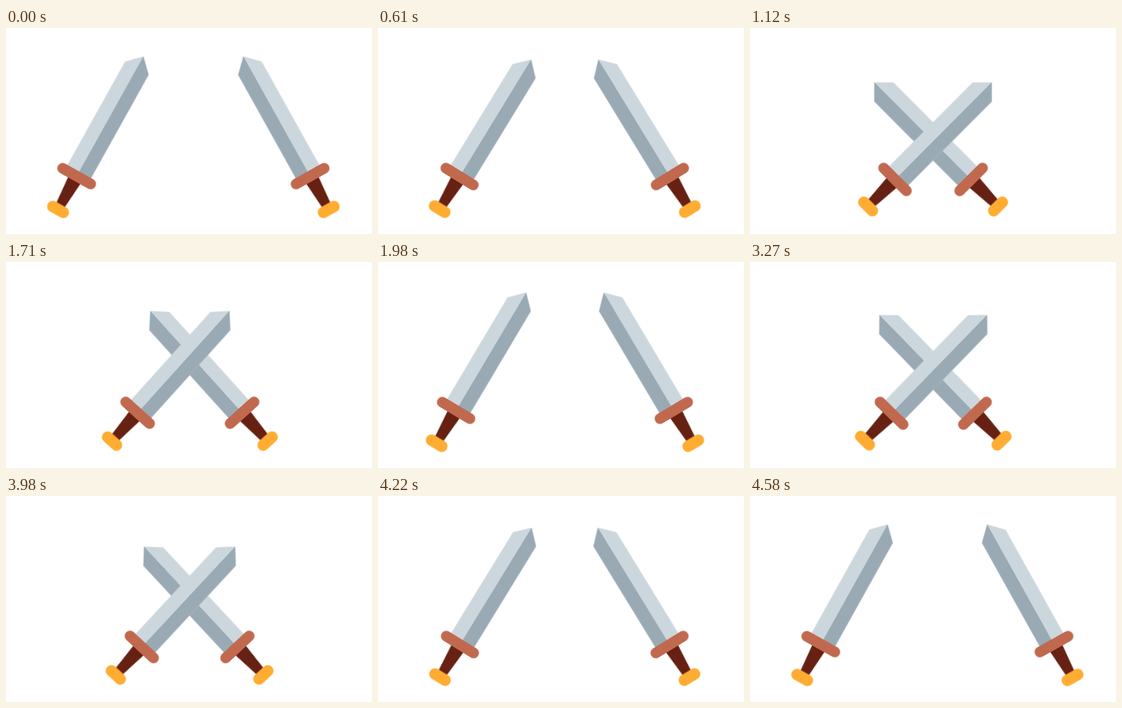
Recreate the animation shown at these times as an HTML page. Size 480 px wide and 270 px high, loop 4610 ms.

```html
<!DOCTYPE html>
<html lang="en">
<head>
<meta charset="utf-8">
<title>Crossing swords</title>
<style>
  html, body {
    margin: 0;
    width: 100%;
    height: 100%;
    overflow: hidden;
    background: #fff;
  }

  svg {
    display: block;
    width: 480px;
    height: 270px;
  }

  /* The origin of a sword is the middle of its grip. */
  .sword {
    --open: translate(80.5px, 216px) rotate(29.15deg);
    --crossed: translate(var(--reach), 216.2px) rotate(45.15deg);
    animation: clash 4610ms cubic-bezier(.7, 0, .05, 1) infinite;
  }

  .left { --reach: 173.9px; }
  .right { --reach: 185.4px; }

  /* Two strikes, 2300 ms apart; the loop cuts off the tail of the last swing. */
  @keyframes clash {
    0%, 6.508% { transform: var(--open); }
    28.2%, 29.826% { transform: var(--crossed); }
    51.518%, 56.399% { transform: var(--open); }
    78.091% { transform: var(--crossed); }
    79.718% { transform: var(--crossed); animation-timing-function: cubic-bezier(.73, 0, .086, .957); }
    100% { transform: var(--open); }
  }
</style>
</head>
<body>
<svg viewBox="0 0 480 270">
  <defs>
    <g id="sword">
      <path fill="#ccd6dd" d="M-17.7-25V-187L0-204.7L17.7-187V-25Z"/>
      <path fill="#9aaab4" d="M0-25V-204.7L17.7-187V-25Z"/>
      <path fill="#662113" d="M-9.5-22H9.5L6.1 20H-6.1Z"/>
      <path stroke="#c1694f" stroke-width="13.8" stroke-linecap="round" d="M-21.2-25H21.2"/>
      <path stroke="#ffac33" stroke-width="14.8" stroke-linecap="round" d="M-8 25H8"/>
    </g>
  </defs>
  <g transform="translate(491.5 0) scale(-1 1)">
    <g class="sword right"><use href="#sword"/></g>
  </g>
  <g class="sword left"><use href="#sword"/></g>
</svg>
</body>
</html>
```
